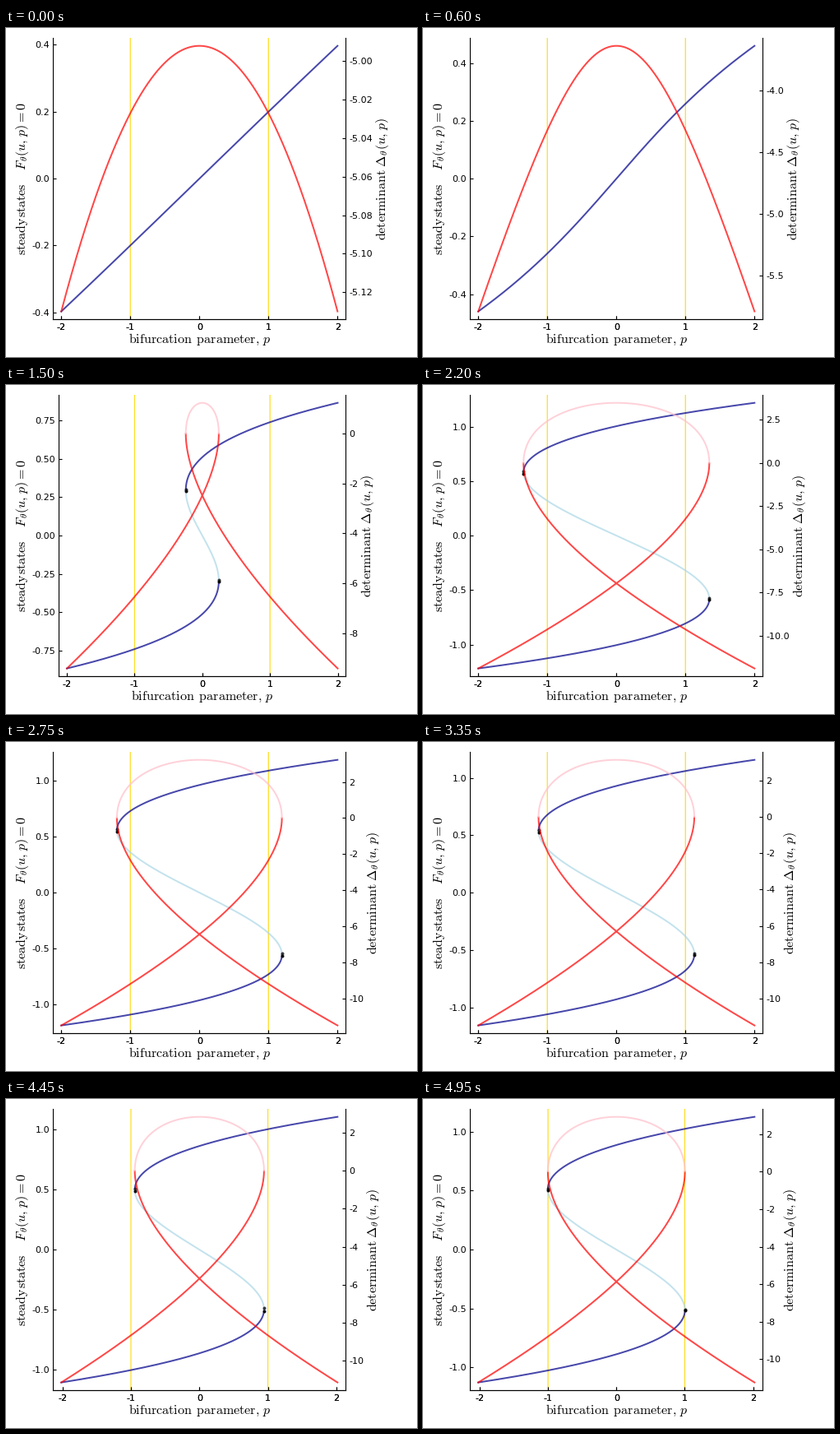
Animation of 500x400 px, one loop 5 s. Source, as a matplotlib script:

```python
import math

import matplotlib.pyplot as plt
import numpy as np
from matplotlib.animation import FuncAnimation

plt.rcParams.update({
    "font.family": "DejaVu Sans",
    "mathtext.fontset": "cm",
    "axes.unicode_minus": False,
    "axes.linewidth": 0.8,
})

W, H, DPI = 500, 400, 100
FRAMES, INTERVAL = 100, 50
TOP, BOTTOM, RIGHT = 12, 354.3, 413.4
PT = 72 / DPI
TICK_PX, LABEL_PX = 11.1, 16

# Optimiser path: step, theta1, theta2, end of p range, dot spread in px
PATH = np.array([
    [0, -4.992, -0.292, 2.0, 0.5],
    [12, -3.634, -3.41, 2.0, 0.5],
    [30, 1.24, -4.75, 2.0, 0.9],
    [33, 2.0, -4.5, 2.0, 1.0],
    [44, 3.48, -3.45, 2.0, 1.4],
    [54, 3.24, -3.475, 2.0, 1.2],
    [67, 3.15, -3.64, 2.0, 1.4],
    [80, 2.876, -3.78, 2.015, 2.4],
    [99, 2.934, -3.725, 2.02, 0.8],
])
STEPS = PATH[:, 0]
SLOPES = np.gradient(PATH[:, 1:3], STEPS, axis=0, edge_order=2)


def theta_at(i):
    """Cubic Hermite interpolation of both parameters."""
    k = min(np.searchsorted(STEPS, i, side="right") - 1, len(STEPS) - 2)
    h = STEPS[k + 1] - STEPS[k]
    s = (i - STEPS[k]) / h
    a, b = PATH[k, 1:3], PATH[k + 1, 1:3]
    return ((1 + 2 * s) * (1 - s) ** 2 * a + s * (1 - s) ** 2 * h * SLOPES[k]
            + s * s * (3 - 2 * s) * b + s * s * (s - 1) * h * SLOPES[k + 1])


def padded(lo, hi):
    pad = 0.03 * (hi - lo)
    return lo - pad, hi + pad


def nice_ticks(lo, hi):
    """Pick the tick step with the best granularity, coverage and niceness."""
    span = hi - lo
    order = math.floor(math.log10(span))
    best = (-1, None, None)
    for z in range(order - 2, order + 1):
        for q, nice in ((1, 1), (5, 0.9), (2, 0.7), (2.5, 0.5), (3, 0.2)):
            step = q * 10.0 ** z
            first, last = math.ceil(lo / step), math.floor(hi / step)
            n = last - first + 1
            if not 4 <= n <= 8:
                continue
            score = (0.25 * (1 - abs(n - 5) / 5) + 0.25 * nice
                     + 0.5 * span / ((n - 1) * step))
            if score > best[0]:
                digits = max(0, (q == 2.5) - z)
                best = (score, [k * step for k in range(first, last + 1)], digits)
    values, digits = best[1:]
    return values, [f"{v:.{digits}f}" for v in values]


def widest(labels):
    """Width in px of the widest tick label."""
    em = {".": 0.318, "-": 0.361}
    return TICK_PX * max(sum(em.get(c, 0.636) for c in s) for s in labels)


fig = plt.figure(figsize=(W / DPI, H / DPI), dpi=DPI, facecolor="white")
ax = fig.add_axes([0.1, 0.1, 0.7, 0.8])
twin = ax.twinx()
twin.xaxis.set_visible(True)
ax.set_xticks(range(-2, 3), [str(k) for k in range(-2, 3)])

for a in (ax, twin):
    a.spines["top"].set_visible(False)
    a.tick_params(direction="in", length=4 * PT, width=0.8,
                  labelsize=TICK_PX * PT, pad=2.9)
    a.tick_params(axis="x", pad=3.4)
ax.spines["right"].set_visible(False)
twin.spines["left"].set_visible(False)

for target in (-1, 1):
    ax.axvline(target, color="gold", lw=0.9, alpha=0.85, snap=False)


def curve(a, color):
    return a.plot([], [], color=color, lw=2 * PT, alpha=0.72)[0]


state_on, state_off = curve(ax, "darkblue"), curve(ax, "lightblue")
det_on, det_off = curve(twin, "red"), curve(twin, "pink")
dots_hi, dots_lo = [
    ax.plot([], [], "o", color="black", ms=4 * PT, mew=0, alpha=alpha, zorder=4)[0]
    for alpha in (0.75, 0.95)
]


def label(x, y, text, **kw):
    return fig.text(x / W, 1 - y / H, text, fontsize=LABEL_PX * PT,
                    va="baseline", rotation_mode="anchor", **kw)


xlabel = label(236, 383, r"$\mathrm{bifurcation}\hspace{0.5}"
               r"\mathrm{parameter},\hspace{0.13}p$", ha="center")
label(24, 276, r"$\mathrm{steady}\hspace{0.08}\mathrm{states}\hspace{1.2}"
      r"F_{\hspace{0.08}\theta}(u,\hspace{0.12}p)=0$", ha="left", rotation=90)
det_label = label(461, 258, r"$\mathrm{determinant}\hspace{0.33}"
                  r"\Delta_\theta(u,\hspace{0.13}p)$", ha="left", rotation=90)


def draw(i):
    t1, t2 = theta_at(i)
    p_end, spread = (np.interp(i, STEPS, PATH[:, c]) for c in (3, 4))

    # Steady states of p + t1 u + t2 u^3 = 0, traced along u
    roots = np.roots([t2, 0, t1, p_end])
    u_end = max(r.real for r in roots if abs(r.imag) < 1e-9)
    u = np.linspace(-u_end, u_end, 1201)
    p = -(t1 * u + t2 * u ** 3)
    det = t1 + 3 * t2 * u ** 2
    stable = det <= 0
    for on, off, y in ((state_on, state_off, u), (det_on, det_off, det)):
        on.set_data(np.where(stable, p, np.nan), y)
        off.set_data(np.where(stable, np.nan, p), y)

    ulim, dlim = padded(-u_end, u_end), padded(det.min(), det.max())
    u_ticks, u_labels = nice_ticks(*ulim)
    d_ticks, d_labels = nice_ticks(*dlim)
    ax.set_yticks(u_ticks, u_labels)
    twin.set_yticks(d_ticks, d_labels)
    ax.set_xlim(*padded(-p_end, p_end))
    ax.set_ylim(*ulim)
    twin.set_ylim(*dlim)

    # Fold points
    if t1 > 0:
        fold = math.sqrt(-t1 / (3 * t2))
        shift = spread * (ulim[1] - ulim[0]) / (BOTTOM - TOP)
        for dots, d in ((dots_hi, shift), (dots_lo, -shift)):
            v = np.array([fold, -fold]) + d
            dots.set_data(-(t1 * v + t2 * v ** 3), v)
    else:
        dots_hi.set_data([], [])
        dots_lo.set_data([], [])

    # Tick label widths push the left spine and the right label
    left = 35.5 + widest(u_labels)
    box = [left / W, 1 - BOTTOM / H, (RIGHT - left) / W, (BOTTOM - TOP) / H]
    ax.set_position(box)
    twin.set_position(box)
    xlabel.set_x((left + RIGHT) / 2 / W)
    det_label.set_x((433.2 + widest(d_labels)) / W)
    return []


anim = FuncAnimation(fig, draw, frames=FRAMES, interval=INTERVAL,
                     init_func=lambda: draw(0), repeat=True, repeat_delay=0)
plt.show()
```
